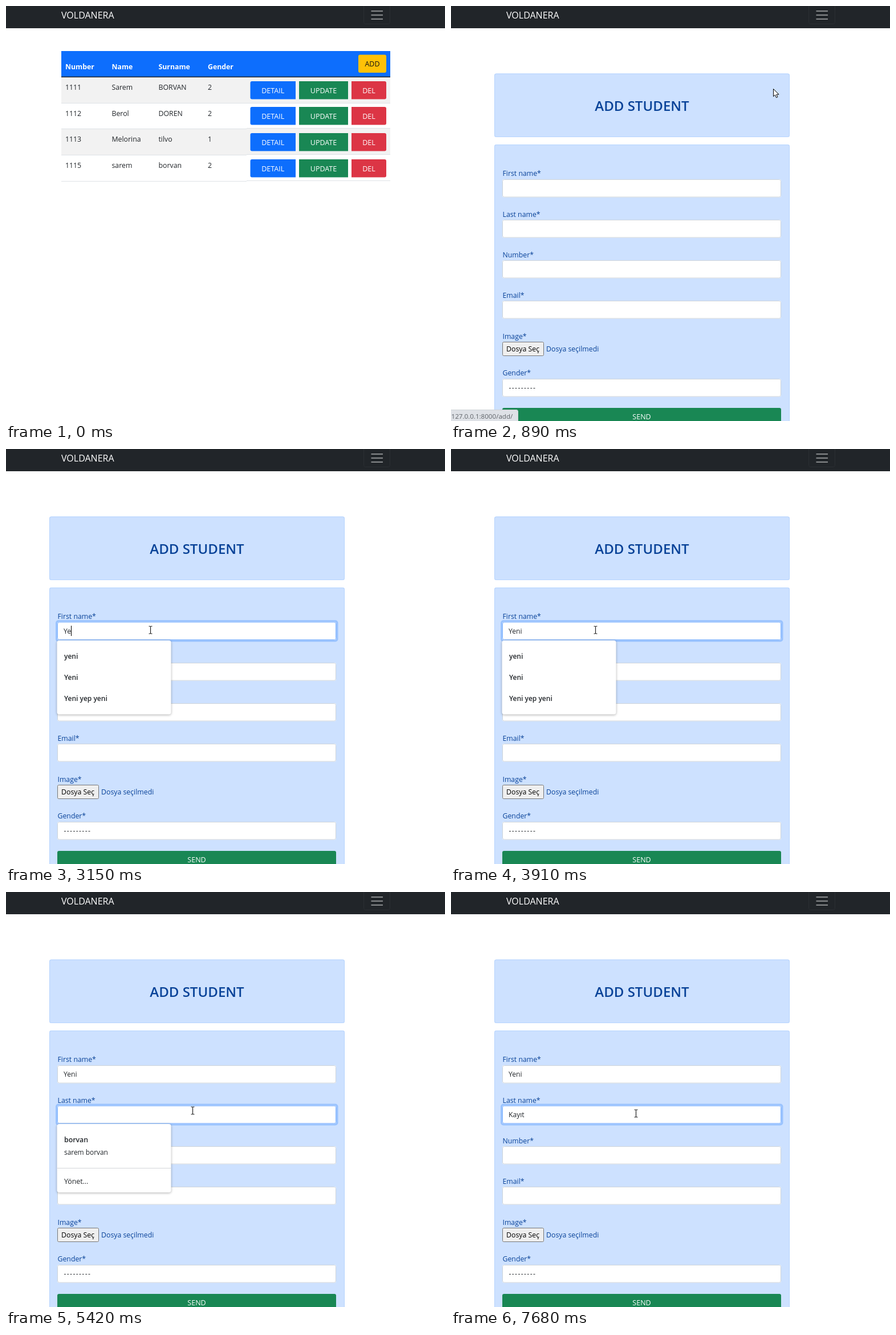
Recreate the animation shown at these times as an HTML page with a canvas. Size 770 by 728 pixels, loop 8 s.

```html
<!DOCTYPE html>
<html lang="en">
<head>
<meta charset="utf-8">
<title>Add student</title>
<style>
  html, body { margin: 0; width: 100%; height: 100%; overflow: hidden; background: #fff; }
  canvas { display: block; }
</style>
</head>
<body>
<canvas id="stage" width="770" height="728"></canvas>
<script>
const ctx = document.getElementById('stage').getContext('2d');
const LOOP = 8000;
const SIZE = 12.3;
const BLUE = '#0d6efd', GREEN = '#198754', RED = '#dc3545', INK = '#212529', NAVY = '#084298';

// Each step holds until the next one starts.
const steps = [
  { at: 0, page: 'list' },
  { at: 130, page: 'list', hover: true, mouse: ['hand', 648, 100] },
  { at: 890, page: 'form', status: true, mouse: ['arrow', 565, 145] },
  { at: 1650, page: 'form', focus: 0, caret: true, menu: 'saved', mouse: ['beam', 253, 317] },
  { at: 2390, page: 'form', focus: 0, menu: 'saved', mouse: ['beam', 253, 317] },
  { at: 3150, page: 'form', focus: 0, first: 'Ye', caret: true, menu: 'first', mouse: ['beam', 253, 317] },
  { at: 3910, page: 'form', focus: 0, first: 'Yeni', menu: 'first', mouse: ['beam', 253, 317] },
  { at: 4660, page: 'form', focus: 1, first: 'Yeni', caret: true, menu: 'saved', mouse: ['beam', 327, 383] },
  { at: 5420, page: 'form', focus: 1, first: 'Yeni', menu: 'saved', mouse: ['beam', 327, 383] },
  { at: 6180, page: 'form', focus: 1, first: 'Yeni', last: 'Kay', caret: true, menu: 'last', mouse: ['beam', 327, 383] },
  { at: 6930, page: 'form', focus: 1, first: 'Yeni', last: 'Kay', menu: 'last', mouse: ['beam', 327, 383] },
  { at: 7680, page: 'form', focus: 1, first: 'Yeni', last: 'Kayıt', mouse: ['beam', 324, 388] }
];

const students = [
  ['1111', 'Sarem', 'BORVAN', '2'],
  ['1112', 'Berol', 'DOREN', '2'],
  ['1113', 'Melorina', 'tilvo', '1'],
  ['1115', 'sarem', 'borvan', '2']
];
const columns = [104, 185.5, 267.5, 354];
const savedNames = ['sarem', 'borvan'];
const suggestions = {
  first: ['yeni', 'Yeni', 'Yeni yep yeni'],
  last: ['kayıt', 'Kayıt']
};

function rect(x, y, w, h, color) {
  ctx.fillStyle = color;
  ctx.fillRect(x, y, w, h);
}

function box(x, y, w, h, radius, fill, border) {
  ctx.beginPath();
  ctx.roundRect(x, y, w, h, radius);
  ctx.fillStyle = fill;
  ctx.fill();
  if (border) {
    ctx.beginPath();
    ctx.roundRect(x + .5, y + .5, w - 1, h - 1, radius);
    ctx.lineWidth = 1;
    ctx.strokeStyle = border;
    ctx.stroke();
  }
}

// y is the middle of the capital letters.
function text(str, x, y, { color = INK, size = SIZE, weight = 400, align = 'left', spacing = 0 } = {}) {
  ctx.font = `${weight} ${size}px "Open Sans", "Noto Sans", sans-serif`;
  ctx.letterSpacing = spacing + 'px';
  ctx.textAlign = align;
  ctx.fillStyle = color;
  ctx.fillText(str, x, Math.round(y + size * .36));
  return ctx.measureText(str).width;
}

function button(label, x, y, w, h, radius, fill, color = '#fff') {
  box(x, y, w, h, radius, fill);
  text(label, x + w / 2, y + h / 2 + .4, { color, align: 'center', size: 12.5 });
}

function navbar() {
  rect(0, 0, 770, 39, INK);
  text('VOLDANERA', 97, 16.5, { color: '#fff', size: 16 });
  box(627, -4, 47, 36, 3, INK, '#2b2f33');
  for (const y of [8, 15, 22]) rect(640.5, y, 20.5, 1.7, '#9b9d9f');
}

function listPage(step) {
  rect(97, 79, 577, 45, BLUE);
  ['Number', 'Name', 'Surname', 'Gender'].forEach((name, i) =>
    text(name, columns[i], 107, { color: '#fff', weight: 700 }));
  button('ADD', 618, 85.5, 49, 31.5, 3, step.hover ? '#ffca2c' : '#ffc107', '#111');

  students.forEach((row, i) => {
    const y = 125 + i * 45.7;
    const top = Math.round(y), end = Math.round(y + 45.7);
    if (i % 2 === 0) {
      rect(97, top, 325, end - top, '#f2f2f2');
      rect(422, top - (i ? 1 : 0), 252, end - top, '#f2f2f2');
    }
    rect(97, end - 1, 325, 1, '#dee2e6');
    rect(422, end - (i ? 2 : 1), 252, 1, '#dee2e6');
    row.forEach((cell, c) => text(cell, columns[c], y + 17.5));
    const by = Math.round(y + 6.6);
    button('DETAIL', 428.5, by, 79.5, 31.5, [3, 0, 0, 3], BLUE);
    button('UPDATE', 514, by, 86, 31.5, 0, GREEN);
    button('DEL', 606, by, 61, 31.5, [0, 3, 3, 0], RED);
  });
  rect(97, 123.7, 577, 1.5, INK);
}

const fieldY = i => 303.5 + i * 71.3;

function field(y, focused) {
  if (focused) {
    box(87, y - 3.3, 495.5, 38, 5, '#9ac3fe');
    box(90, y, 489, 31.5, 3, '#fff', '#86b7fe');
  } else {
    box(90, Math.round(y), 489, 31.5, 3, '#fff', '#ced4da');
  }
}

function menuPanel(y, h) {
  ctx.save();
  ctx.shadowColor = 'rgba(0,0,0,.32)';
  ctx.shadowBlur = 4;
  ctx.shadowOffsetY = 1;
  box(89.5, y, 200, h, 4, '#fff');
  ctx.restore();
}

function menu(kind, focus) {
  const y = fieldY(focus) + 32.3;
  if (kind === 'saved') {
    menuPanel(y, 120);
    text(savedNames[focus], 102, y + 27.4, { weight: 600 });
    text(savedNames.join(' '), 102, y + 49.8, { size: 11.9 });
    rect(90, Math.round(y + 77), 199, 1, '#d4d6d9');
    text('Yönet...', 102, y + 100.2);
    return;
  }
  const items = suggestions[kind];
  menuPanel(y, 18 + items.length * 37.2);
  items.forEach((item, i) => text(item, 102, y + 27.4 + i * 37.2, { weight: 600, size: 12 }));
}

function formPage(step) {
  const card = '#cde1ff', edge = '#b6d4fe';
  box(76, 118.5, 518, 111.5, 3, card, edge);
  text('ADD STUDENT', 335, 175.5, { color: NAVY, size: 24, weight: 600, align: 'center' });
  box(76, 243, 518, 520, 3, card, edge);

  ['First name*', 'Last name*', 'Number*', 'Email*'].forEach((label, i) => {
    text(label, 90.5, fieldY(i) - 9.5, { color: NAVY });
    field(fieldY(i), step.focus === i);
  });
  text('Image*', 90.5, 579.5, { color: NAVY });
  box(90, 589, 73, 25, 2, '#efefef', '#767676');
  text('Dosya Seç', 97, 601.5, { color: '#000' });
  text('Dosya seçilmedi', 167, 601.5, { color: NAVY });
  text('Gender*', 90.5, 644, { color: NAVY });
  field(653.5);
  text('---------', 101.5, 669.5, { spacing: 1.35 });
  button('SEND', 90, 705, 489, 31, 3, GREEN);

  [step.first, step.last].forEach((value = '', i) => {
    const width = text(value, 101, fieldY(i) + 16.3, { size: 12.1 });
    if (step.caret && step.focus === i) {
      rect(Math.round(101 + width), Math.round(fieldY(i) + 6.5), 1, 18, '#000');
    }
  });
  if (step.menu) menu(step.menu, step.focus);

  if (step.status) {
    box(-4, 708, 122, 24, [0, 4, 0, 0], '#dee1e6', '#cfd2d6');
    text('127.0.0.1:8000/add/', 0.5, 719.5, { color: '#5f6368', size: 11.6 });
  }
}

const pointers = {
  arrow() {
    outline('M0 0V13.2L3 10.4L5 15.2L7.4 14.2L5.4 9.6H9.6Z');
  },
  hand() {
    outline('M-2 1.5Q-2 0 -.6 0Q.8 0 .8 1.5V6Q2.6 5 3.4 6.6Q5 6 5.6 7.4Q7 7 7 9V13' +
      'Q7 15 5.6 16.4V19H-2V17L-5.4 11.8Q-6 10.2 -4.6 10Q-3.2 10 -2 12Z');
    ctx.beginPath();
    for (const x of [.8, 3.2, 5.2]) {
      ctx.moveTo(x, 7);
      ctx.lineTo(x, 10);
    }
    ctx.stroke();
  },
  beam() {
    ctx.strokeStyle = '#222';
    ctx.lineWidth = 1.2;
    ctx.stroke(new Path2D('M-3 -6.5H-1L0 -5.7L1 -6.5H3M0 -5.7V5.7M-3 6.5H-1L0 5.7L1 6.5H3'));
  }
};

function outline(d) {
  const path = new Path2D(d);
  ctx.fillStyle = '#fff';
  ctx.strokeStyle = '#000';
  ctx.lineWidth = 1;
  ctx.lineJoin = 'round';
  ctx.fill(path);
  ctx.stroke(path);
}

function drawPointer([kind, x, y]) {
  ctx.save();
  ctx.translate(x + .5, y + .5);
  pointers[kind]();
  ctx.restore();
}

const start = performance.now();

function draw(now) {
  const t = Math.max(0, now - start) % LOOP;
  const step = steps.findLast(s => s.at <= t);
  rect(0, 0, 770, 728, '#fff');
  navbar();
  (step.page === 'list' ? listPage : formPage)(step);
  if (step.mouse) drawPointer(step.mouse);
  requestAnimationFrame(draw);
}
draw(start);
</script>
</body>
</html>
```
